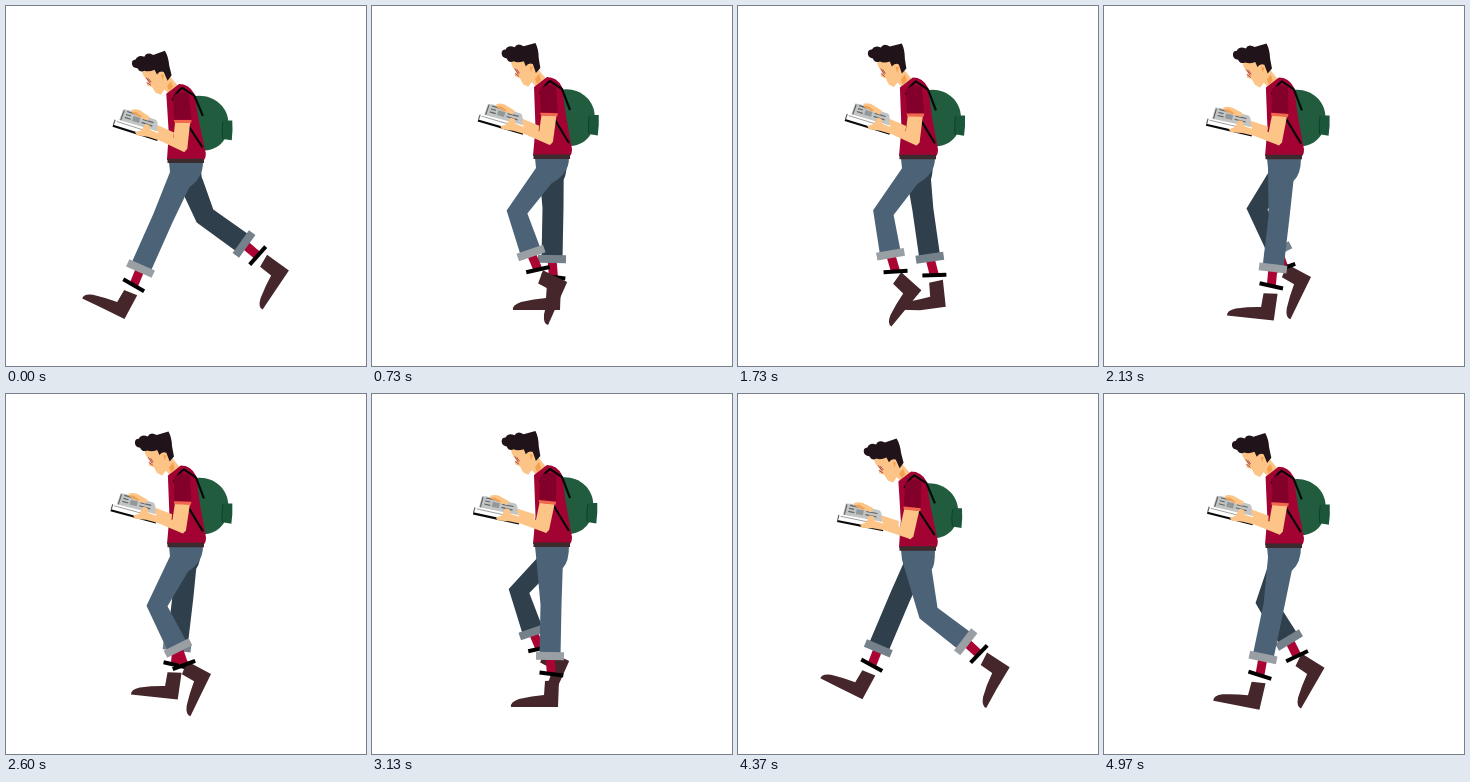
These frames come from a looping animation (360 by 360 pixels, 5000 ms). An HTML page:

```html
<!DOCTYPE html>
<html lang="en">
<head>
<meta charset="utf-8">
<title>Walking reader</title>
<style>
html, body { margin: 0; width: 100%; height: 100%; overflow: hidden; background: #fff; }
svg { display: block; width: 100vw; height: 100vh; }
.skin { fill: #fcc486; }
.shade { fill: #f5a04f; }
.shirt { fill: #a20332; }
.sleeve { fill: #820029; }
.shoe { fill: #45272b; }
.strap { fill: none; stroke: #08090b; stroke-width: 2.2; stroke-linejoin: round; }
.sock { stroke: #ab0433; stroke-width: 9; }
.near .pants { fill: #4b6277; }
.near .cuff { fill: #9a9fa4; }
.far .pants { fill: #2f3f4c; }
.far .cuff { fill: #74808a; }
</style>
</head>
<body>
<svg viewBox="0 0 360 360">
  <g class="far" id="farLeg"></g>
  <g class="near" id="nearLeg"></g>

  <g id="torso">
    <g id="pack">
      <path fill="#215c3e" d="M187 84C204 80 222 92 222 111C222 129 212 139 198 140L192 128Z"/>
      <path fill="#1c563a" d="M217 109L226 109Q226.500 119 225 129.500L216 128Q214.500 119 217 109Z"/>
      <path fill="none" stroke="#123f29" d="M216.500 110Q215 119 216 128"/>
    </g>
    <path class="skin" d="M158 74L166 63L175 74L166 83Z"/>
    <path class="shade" d="M163 73L167 68L169 74L165 78Z"/>
    <path class="shirt" d="M162 81L175 71Q185 71 190 81L194 110L200 143Q200 148 198 150L161 150L163.500 122Z"/>
    <rect x="161.500" y="148.500" width="36.500" height="4.500" fill="#3b2a2e"/>
    <path class="strap" d="M168 88Q172 79 178 75L190 83L198 104M180 109L197 137"/>
  </g>

  <g id="arm">
    <path class="sleeve" d="M168 83Q176 76 184 81L185 107L168 106Z"/>
    <path class="skin" d="M168.500 109L183.500 110L179 136L176 139L165 129Z"/>
    <path fill="#f0694e" d="M167.500 106.500L185 107.500L184.500 110.500L168 109.500Z"/>
    <g id="forearm">
      <path class="skin" d="M165 120L146 113L144 119L164 130Z"/>
      <path fill="#fff" d="M106 110L149 120L149 127L104 116.500Z"/>
      <path fill="#c3c5c4" d="M113 100L118 100.500L146 108.500Q149 110 148 120L109.500 111Z"/>
      <g fill="none" stroke="#5f6467">
        <path stroke-width="1.200" d="M114 101L111 111M105.500 111L104 116M117 102L127 104.500M116 105L121 106.200M115 108L121 109.500M133 109L144 111.500M132 112L143 115"/>
        <path stroke="#92979a" stroke-width="5" d="M123 108.500L130 110.200"/>
        <path stroke="#888" stroke-width=".8" d="M107 112.500L148 123"/>
        <path stroke="#08090b" stroke-width="2.200" d="M103.500 117L149 128.500"/>
      </g>
      <path class="skin" d="M121 100Q128 98 133 102L140 106L138 110L130 107L122 103Z"/>
      <path class="shade" d="M121 102L126 102L132 106L130 107Z"/>
      <path class="skin" d="M176 139L151 129L139 126L128 125L126 122L132 120L136 113L140 114L141 119L150 122L167 126L177 131Z"/>
    </g>
  </g>

  <g id="head">
    <path class="skin" d="M138 53L139 59L143 66L142 70L147 72L150 78L155 80.500L163 71L166 61L158 48Z"/>
    <circle class="skin" cx="158.500" cy="62" r="4.500"/>
    <path class="shade" d="M157 60L160 61L158 66Z"/>
    <path fill="none" stroke="#a53a4b" stroke-width=".9" d="M142 62L145.500 68M142 67L146 70M144 63L146.500 67"/>
    <path fill="#20141a" d="M129 47Q129 43 133 43Q136 38 142 41Q145 36 151 40L163 37Q166 43 166 52L167.500 62L163 67L160 58Q156 56 153 60L151 55Q145 57 141 55Q136 57 134 52Q129 51 129 47Z"/>
  </g>
</svg>
<script>
const LOOP = 5000, STRIDE = 24, RAD = Math.PI / 180;
const $ = id => document.getElementById(id);
const wave = (frame, period, peak = 0) => Math.cos(2 * Math.PI * (frame - peak) / period);

// frame, knee x y, cuff x y, ankle x y, foot angle, toe bend
const POSES = [
  [0, 157, 212, 134.5, 262.5, 124.5, 287, 26, 0],
  [4, 170, 211, 159, 263.5, 154.5, 289, 11, 0],
  [5, 175, 211, 169, 262, 166.5, 288, 6, 0],
  [6, 179, 211, 178, 262, 180, 287, 0, 0],
  [9, 190, 215, 213, 257, 227, 279, -26, 27],
  [12, 197, 219, 236, 247, 256, 264, -56, 0],
  [16, 160, 217, 183, 255, 193, 275, -60, 0],
  [17, 151, 212, 172, 254, 179, 274, -64, 0],
  [18, 145, 206, 159, 247, 169, 271, -66, 0],
  [21, 149, 210, 143, 254, 142, 277, -14, 0]
];

function poseKey(i) {
  const n = POSES.length, turn = Math.floor(i / n);
  const [frame, ...values] = POSES[i - turn * n];
  return { frame: frame + turn * STRIDE, values };
}

// Cyclic spline through the poses, with unevenly spaced keys.
function legPose(frame) {
  frame = ((frame % STRIDE) + STRIDE) % STRIDE;
  let i = POSES.length - 1;
  while (POSES[i][0] > frame) i--;
  const [a, b, c, d] = [-1, 0, 1, 2].map(k => poseKey(i + k));
  const span = c.frame - b.frame, u = (frame - b.frame) / span;
  return b.values.map((p, k) => {
    const q = c.values[k];
    const m = (q - a.values[k]) / (c.frame - a.frame) * span;
    const n = (d.values[k] - p) / (d.frame - b.frame) * span;
    return p + u * m + u * u * (3 * (q - p) - 2 * m - n) + u * u * u * (2 * (p - q) + m + n);
  });
}

function makeLeg(group, hip, dx, dy) {
  const add = (name, cls, attrs = {}) => {
    const node = document.createElementNS("http://www.w3.org/2000/svg", name);
    node.setAttribute("class", cls);
    for (const key in attrs) node.setAttribute(key, attrs[key]);
    return group.appendChild(node);
  };
  const sock = add("line", "sock");
  const pants = add("path", "pants");
  const cuff = add("rect", "cuff", { x: -14, y: -4, width: 28, height: 8 });
  const shoe = add("path", "shoe");
  const band = add("rect", "band", { x: -12, y: -2, width: 24, height: 4 });

  return (frame, drop) => {
    const pose = legPose(frame);
    const [kx, ky, cx, cy, ax, ay] = pose.slice(0, 6).map((v, i) => v + (i % 2 ? dy : dx));
    const [angle, bend] = pose.slice(6);
    const top = 152 + drop, hx = (hip[0] + hip[1]) / 2, hy = top + 6;
    const thigh = Math.atan2(ky - hy, kx - hx);
    const shin = Math.atan2(cy - ky, cx - kx);
    const ankle = Math.atan2(ay - cy, ax - cx);
    const side = (x, y, dir, w) => `${x - w * Math.sin(dir)} ${y + w * Math.cos(dir)}`;
    const kneeDir = (thigh + shin) / 2;
    const seat = side(hx + 16 * Math.cos(thigh), hy + 16 * Math.sin(thigh), thigh, -11);

    pants.setAttribute("d",
      `M${hip[0]} ${top}L${hip[0] + 1} ${top + 10}L${side(kx, ky, kneeDir, 10.5)}` +
      `L${side(cx, cy, shin, 10.5)}L${side(cx, cy, shin, -10.5)}L${side(kx, ky, kneeDir, -10.5)}` +
      `L${seat}Q${hip[1]} ${top + 16} ${hip[1]} ${top}Z`);
    cuff.setAttribute("transform", `translate(${cx} ${cy}) rotate(${shin / RAD - 90})`);

    const bx = cx + 18 * Math.cos(ankle), by = cy + 18 * Math.sin(ankle);
    const ends = { x1: cx, y1: cy, x2: bx, y2: by };
    for (const key in ends) sock.setAttribute(key, ends[key]);
    band.setAttribute("transform", `translate(${bx} ${by}) rotate(${shin / RAD - 84})`);

    // The front of the shoe turns about the ball of the foot.
    const bs = Math.sin(bend * RAD), bc = Math.cos(bend * RAD);
    const toe = (x, y) => `${-20 + x * bc - y * bs} ${26 + x * bs + y * bc}`;
    shoe.setAttribute("d",
      `M-7 0L7 -1L6 26L-20 26L${toe(-21, 0)}Q${toe(-22, -5)} ${toe(-13, -8)}Q${toe(0, -11)} -8 14Z`);
    shoe.setAttribute("transform", `translate(${ax} ${ay}) rotate(${angle})`);
  };
}

const nearLeg = makeLeg($("nearLeg"), [163, 197], 0, 0);
const farLeg = makeLeg($("farLeg"), [166, 195], 2, -9);

function draw(time) {
  // 25 drawings a second, shown on a 30 per second clock.
  const tick = Math.floor((time + 4) * 0.03);
  const frame = Math.floor(tick * 5 / 6);
  const bob = (1 + wave(frame, 12)) / 2;
  const nod = -3 * (1 + wave(frame, 12, 1.5));
  const swing = wave(frame, STRIDE, 22);
  const lean = 0.024 * bob, squash = 1 - 0.0375 * bob;

  nearLeg(frame, 4 * bob);
  farLeg(frame + STRIDE / 2, 4 * bob);
  $("torso").setAttribute("transform",
    `matrix(1 0 ${lean} ${squash} ${-152 * lean} ${152 * (1 - squash) + 4 * bob})`);
  $("pack").setAttribute("transform", `translate(${1.5 * swing} 0)`);
  $("arm").setAttribute("transform", `translate(${-bob} ${7 * bob}) rotate(${-4.2 * swing} 178 84)`);
  $("forearm").setAttribute("transform", `rotate(${8.2 * swing} 176 134)`);
  $("head").setAttribute("transform", `translate(${1 - 2 * bob} ${7.5 * bob}) rotate(${nod} 165 72)`);
}

const start = performance.now();
function play() {
  draw((performance.now() - start) % LOOP);
  requestAnimationFrame(play);
}
play();
</script>
</body>
</html>
```
